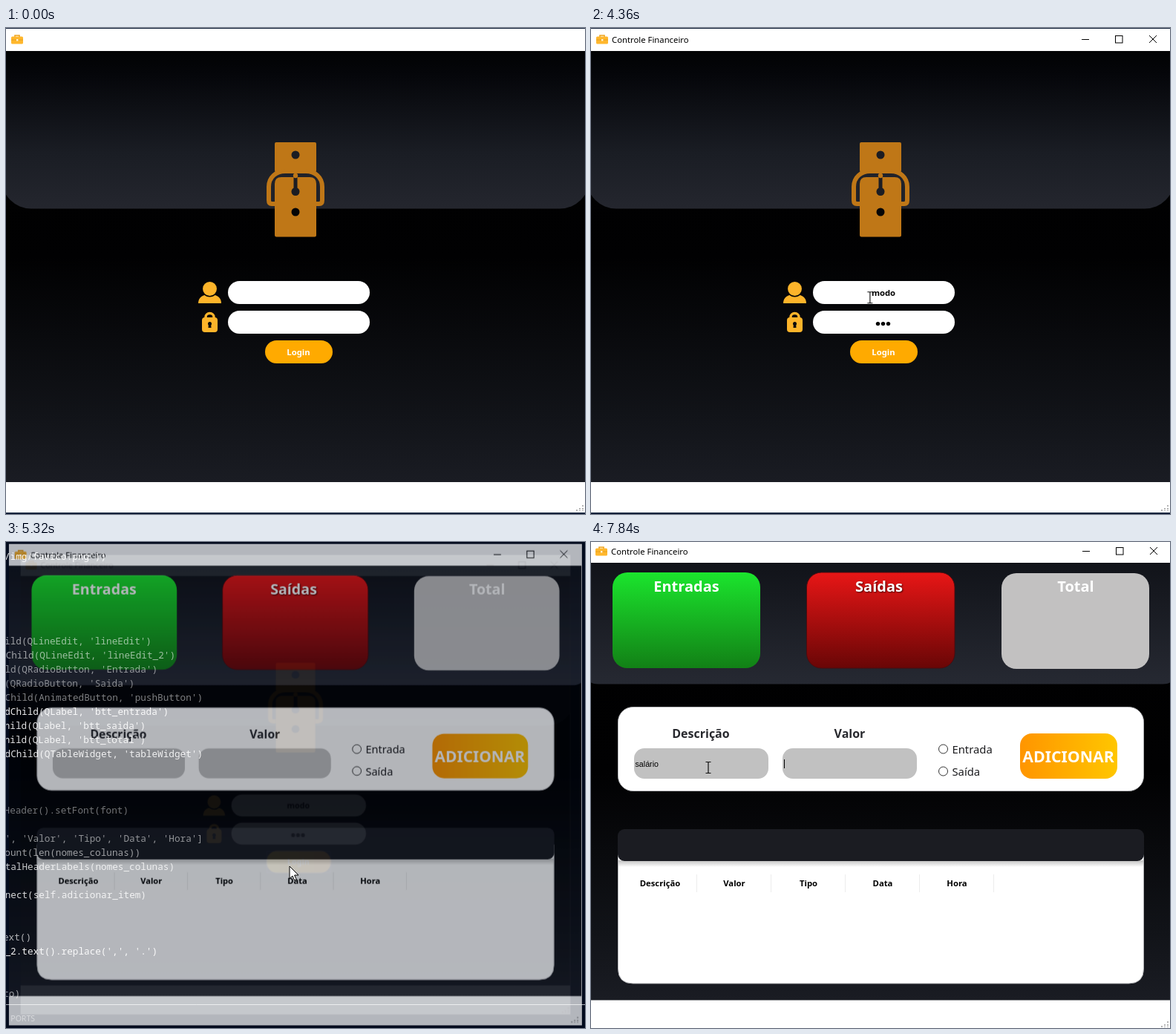
An HTML page that plays this animation: 780x655 px, repeating every 8 s.

```html
<!DOCTYPE html>
<html lang="pt">
<head>
<meta charset="utf-8">
<title>Controle Financeiro</title>
<style>
html, body { margin: 0; width: 100%; height: 100%; overflow: hidden; background: #020b1e; }
svg { display: block; width: 780px; height: 655px; font-family: "Noto Sans", "Open Sans", sans-serif; }
.b { font-weight: bold; }
.mid { text-anchor: middle; }
.title, .sm { font-size: 11.3px; }
.big { font-size: 20px; fill: #fff; }
.hint { fill: #6c5b3e; }
.lab { font-size: 16px; fill: #28292e; }
.radio { font-size: 14.8px; fill: #1c1c1f; }
.entry { font: 10.7px "Liberation Sans", Arial, sans-serif; }
.code text { font: 12.7px "Noto Sans Mono", monospace; fill: #fff; text-anchor: end; white-space: pre; }

#login, #main, #code, #hover, #mouse { animation: 8s linear infinite; }
#login { animation-name: leave; transform-origin: 390px 328px; }
#main { animation-name: enter; transform-origin: 360px 282px; }
#code { animation-name: flash; }
#hover { animation-name: glow; }
#mouse { animation-name: move; }

@keyframes leave {
  0%, 64.9% { opacity: 1; transform: none; }
  66.5% { opacity: .25; transform: scale(.95); }
  67.4%, 100% { opacity: 0; transform: scale(.92); }
}
@keyframes enter {
  0%, 64.9% { opacity: 0; transform: scale(.93); }
  66.5% { opacity: .7; transform: scale(.9834); }
  68.25%, 100% { opacity: 1; transform: none; }
}
@keyframes flash {
  0%, 64.9% { opacity: 0; }
  66.5% { opacity: 1; }
  67.4%, 100% { opacity: 0; }
}
@keyframes glow {
  0%, 59.3% { opacity: 0; }
  60.7%, 100% { opacity: 1; }
}
@keyframes move {
  0%, 3.375% { transform: translate(300px, 662px); }
  6.9% { transform: translate(290px, 500px); }
  10% { transform: translate(297px, 372px); }
  12.75% { transform: translate(372px, 356px); }
  14.5%, 53.75% { transform: translate(375px, 354px); }
  60.6%, 67.4% { transform: translate(382px, 437px); }
  71.75%, 73% { transform: translate(173px, 311px); }
  75.25%, 100% { transform: translate(158px, 304px); }
}
</style>
</head>
<body>
<svg viewBox="0 0 780 655">
  <defs>
    <linearGradient id="flap" gradientUnits="userSpaceOnUse" x1="0" y1="31" x2="0" y2="243">
      <stop offset="0" stop-color="#010203"/><stop offset=".15" stop-color="#05060a"/>
      <stop offset=".65" stop-color="#1a1d24"/><stop offset="1" stop-color="#24262e"/>
    </linearGradient>
    <linearGradient id="night" x1="0" y1="0" x2="0" y2="1">
      <stop offset="0" stop-color="#000"/><stop offset=".48" stop-color="#010102"/>
      <stop offset=".84" stop-color="#111318"/><stop offset="1" stop-color="#1a1c23"/>
    </linearGradient>
    <linearGradient id="head" x1="0" y1="0" x2="0" y2="1">
      <stop offset="0" stop-color="#111319"/><stop offset="1" stop-color="#262932"/>
    </linearGradient>
    <linearGradient id="green" x1="0" y1="0" x2="0" y2="1">
      <stop offset="0" stop-color="#1be52d"/><stop offset="1" stop-color="#128016"/>
    </linearGradient>
    <linearGradient id="red" x1="0" y1="0" x2="0" y2="1">
      <stop offset="0" stop-color="#e81616"/><stop offset="1" stop-color="#690606"/>
    </linearGradient>
    <linearGradient id="amber">
      <stop offset="0" stop-color="#ff9500"/><stop offset="1" stop-color="#ffc600"/>
    </linearGradient>
    <linearGradient id="amberRev">
      <stop offset="0" stop-color="#ffc600"/><stop offset="1" stop-color="#ff9200"/>
    </linearGradient>
    <linearGradient id="shade" x1="0" y1="0" x2="0" y2="1">
      <stop offset="0" stop-color="#000" stop-opacity=".25"/><stop offset="1" stop-color="#000" stop-opacity="0"/>
    </linearGradient>
    <g id="case">
      <path d="M5 3V1H11V3" fill="none" stroke="#f0a41c" stroke-width="1.6"/>
      <rect y="2.5" width="16" height="10" rx="1.5" fill="#ffb72d"/>
      <path d="M0 7H16" stroke="#e09a1c" stroke-width=".8"/>
      <rect x="7" y="6" width="2.4" height="2.4" fill="#fff3d6"/>
    </g>
    <g id="minmax" fill="none"><path d="M0 5.5H10"/><rect x="45.5" y=".5" width="9.5" height="9.5"/></g>
    <path id="close" d="M91 0L101 10M101 0L91 10"/>
    <g id="grip" fill="#b4b4b4">
      <path d="M776 643h2v2h-2zM772 647h2v2h-2zM776 647h2v2h-2zM768 651h2v-2h-2zM772 651h2v-1h-2zM776 651h2v-1h-2z"/>
    </g>
  </defs>

  <rect width="780" height="655" fill="#020b1e"/>
  <path d="M0 623.5H780" stroke="#5a6474"/>

  <g id="login">
    <rect width="780" height="655" fill="#14233c"/>
    <rect y="1" width="780" height="652" fill="#fff"/>
    <use href="#case" x="7" y="9"/>
    <text class="title" x="28" y="20" fill="#c2b39c" data-on="0-70">Controle Financeiro</text>
    <text class="title" x="28" y="20" data-on="70-8000">Controle Financeiro</text>
    <g transform="translate(661 10)">
      <use href="#minmax" stroke="#aaa" data-on="0-70"/><use href="#minmax" stroke="#000" data-on="70-8000"/>
      <use href="#close" stroke="#aaa" data-on="0-270"/><use href="#close" stroke="#000" data-on="270-8000"/>
    </g>
    <svg y="31" width="780" height="581" viewBox="0 31 780 581">
      <rect y="31" width="780" height="581" fill="url(#night)"/>
      <rect x="-6" y="-20" width="792" height="263.5" rx="40" fill="url(#flap)"/>
    </svg>
    <use href="#grip"/>

    <g fill="#bf7717">
      <rect x="362" y="154" width="56" height="40" rx="2"/>
      <path d="M362 237H358Q354 237 354 232V214C354 201 364 193 376 193H404C416 193 426 201 426 214V232Q426 237 422 237H418"
            fill="#20222a" stroke="#bf7717" stroke-width="6"/>
      <path d="M362 210Q362 201 371 201H409Q418 201 418 210V279Q418 281.500 415.500 281.500H364.500Q362 281.500 362 279Z"/>
      <g fill="#1c1d23">
        <circle cx="390" cy="171" r="5.500"/><circle cx="390" cy="220.500" r="5.500"/>
        <rect x="387.500" y="199" width="5" height="20"/>
      </g>
      <circle cx="390" cy="248" r="5.500" fill="#050506"/>
      <circle cx="390" cy="199" r="3.200"/>
    </g>

    <g fill="#fdb42a">
      <path d="M259 371C259 363 265 359 274.500 359S290 363 290 371Z"/>
      <circle cx="274.500" cy="351.500" r="10.200" stroke="#050506" stroke-width="1.500"/>
      <path d="M269 391V389.500A5.500 5 0 0 1 280 389.500V391" fill="none" stroke="#fdb42a" stroke-width="3.500"/>
      <rect x="264" y="390" width="21" height="20" rx="4"/>
      <path d="M273 398H276L276.500 404H272.500Z" fill="#0a0a0b"/><circle cx="274.500" cy="398.500" r="2.500" fill="#0a0a0b"/>
    </g>

    <g fill="#fff">
      <rect x="299" y="341" width="191" height="31" rx="15.500"/>
      <rect x="299" y="381" width="191" height="31" rx="15.500"/>
    </g>
    <g class="b sm mid">
      <text class="hint" x="394" y="361" data-on="0-950">Username</text>
      <text class="hint" x="394" y="401" data-on="0-2570">Password</text>
      <g id="user"></g>
      <rect x="349" y="421" width="91" height="31" rx="15.500" fill="#ffaa00"/>
      <rect id="hover" x="349" y="421" width="91" height="31" rx="15.500" fill="url(#amberRev)"/>
      <text x="394" y="441" fill="#fff">Login</text>
      <rect x="349.500" y="421.500" width="90" height="30" fill="none" stroke="#3f5c96" stroke-dasharray="1 1" data-on="5050-8000"/>
    </g>
    <g id="pass"></g>
  </g>

  <g id="main">
    <rect x="-2" y="-2" width="784" height="659" fill="#fff"/>
    <use href="#case" x="6" y="6"/>
    <text class="title" x="27" y="17">Controle Financeiro</text>
    <g transform="translate(662 7)" stroke="#000"><use href="#minmax"/><use href="#close"/></g>
    <rect x="-2" y="28" width="784" height="589.500" fill="url(#night)"/>
    <path d="M-2 28H782V188Q778 191.500 770 191.500H10Q2 191.500 -2 188Z" fill="url(#head)"/>
    <use href="#grip" y="3"/>

    <rect x="29" y="41" width="199" height="129" rx="20" fill="url(#green)"/>
    <rect x="290.500" y="41" width="199.500" height="129" rx="20" fill="url(#red)" stroke="#4d0b0e"/>
    <rect x="553" y="42" width="199" height="129" rx="20" fill="#c2c1c1"/>
    <g class="b big mid">
      <text x="128.500" y="67">Entradas</text>
      <text x="388" y="67" style="text-shadow:1px 1px 2px #400">Saídas</text>
      <text x="653" y="67">Total</text>
    </g>

    <rect x="36.500" y="222.500" width="708" height="113" rx="20" fill="#fff" stroke="#b5b6b9"/>
    <g class="b lab mid"><text x="148" y="264">Descrição</text><text x="348.500" y="264">Valor</text></g>
    <g fill="#c1c1c1">
      <rect x="58" y="278" width="181" height="41" rx="14"/><rect x="258" y="278" width="181" height="41" rx="14"/>
    </g>
    <g fill="#fff" stroke="#333">
      <circle cx="474.500" cy="279" r="6"/><circle cx="474.500" cy="309" r="6"/>
    </g>
    <g class="radio"><text x="486.500" y="285">Entrada</text><text x="486.500" y="315">Saída</text></g>
    <rect x="578" y="258" width="131" height="61" rx="16" fill="url(#amber)"/>
    <text class="b mid" x="643" y="297" font-size="21.300" fill="#fff">ADICIONAR</text>

    <path d="M36.500 410H744.500V575Q744.500 595 724.500 595H56.500Q36.500 595 36.500 575Z" fill="#fff" stroke="#b5b6b9"/>
    <rect x="37" y="429" width="707" height="9" fill="url(#shade)"/>
    <rect x="36" y="387" width="709" height="43" rx="9" fill="#1b1c22"/>
    <path d="M142.500 448v24m100-24v24m100-24v24m100-24v24m100-24v24" stroke="#ececec"/>
    <g class="b sm mid" id="cols"></g>
    <g class="entry" id="desc"></g>
    <rect x="260" y="293" width="1" height="12" data-on="7840-8000"/>
  </g>

  <g id="code" class="code"></g>

  <g id="mouse">
    <path d="M0 0V16.500L4 13L6.700 19L9.300 17.900L6.600 12H12Z" fill="#fff" stroke="#000" data-on="270-820,4419-4479,4684-5718"/>
    <path d="M-3.500 -7.500H-1Q0 -7.500 0 -6.500Q0 -7.500 1 -7.500H3.500M0 -6.500V7M-3.500 7.500H-1Q0 7.500 0 6.500Q0 7.500 1 7.500H3.500"
          fill="none" stroke="#111" stroke-width="1.200" data-on="820-4419,4479-4684,5718-8000"/>
  </g>
</svg>

<script>
const LOOP = 8000;
const byId = id => document.getElementById(id);

function add(parent, tag, attrs, text = '') {
  const el = document.createElementNS('http://www.w3.org/2000/svg', tag);
  for (const k in attrs) el.setAttribute(k, attrs[k]);
  el.textContent = text;
  return parent.appendChild(el);
}

// Each state: text, start, end, caret shown (1 or 0)
function typing(box, x, y, centred, states) {
  for (const [text, from, to, caret] of states) {
    const on = `${from}-${to}`;
    const el = add(box, 'text', { x, y, 'data-on': on }, text);
    const width = text ? el.getComputedTextLength() : 0;
    const end = Math.round(x + (centred ? width / 2 : width));
    if (caret) add(box, 'rect', { x: end, y: y - 11, width: 1, height: 13, 'data-on': on });
  }
}

function dots(box, states) {
  for (const [n, from, to, caret] of states) {
    const g = add(box, 'g', { 'data-on': `${from}-${to}` });
    for (let i = 0; i < n; i++) add(g, 'circle', { cx: 393.5 + 7 * (i - (n - 1) / 2), cy: 398.6, r: 2.7 });
    if (caret) add(g, 'rect', { x: 394 + Math.round(3.5 * n), y: 390, width: 1, height: 13 });
  }
}

typing(byId('user'), 394, 361, true, [
  ['', 950, 1950, 1], ['m', 1950, 2090, 1], ['mo', 2090, 2220, 1], ['mod', 2220, 2360, 1],
  ['modo', 2360, 2570, 1], ['modo', 2570, LOOP, 0]
]);
dots(byId('pass'), [
  [0, 2570, 2970, 1], [1, 2970, 3230, 1], [2, 3230, 3430, 1], [3, 3430, 3960, 1],
  [3, 3960, 4490, 0], [3, 4490, 5020, 1], [3, 5020, LOOP, 0]
]);
typing(byId('desc'), 59.5, 303, false, [
  ['', 5880, 6560, 1], ['s', 6700, 6900, 1], ['sa', 6900, 7160, 1], ['sal', 7160, 7230, 1],
  ['salá', 7230, 7360, 1], ['salár', 7360, 7560, 1], ['salári', 7560, 7630, 1],
  ['salário', 7630, 7840, 1], ['salário', 7840, LOOP, 0]
]);

['Descrição', 'Valor', 'Tipo', 'Data', 'Hora'].forEach((name, i) =>
  add(byId('cols'), 'text', { x: 93 + 100 * i, y: 464 }, name));

// Right edge, middle line, opacity, text
[
  [135, 20, .95, "/img/favico.png'))"],
  [196, 134, .6, "ild(QLineEdit, 'lineEdit')"],
  [228, 153, .6, "Child(QLineEdit, 'lineEdit_2')"],
  [204, 172, .55, "ld(QRadioButton, 'Entrada')"],
  [173, 191, .5, "(QRadioButton, 'Saida')"],
  [265, 210, .5, "Child(AnimatedButton, 'pushButton')"],
  [219, 229, .95, "dChild(QLabel, 'btt_entrada')"],
  [188, 248, .9, "hild(QLabel, 'btt_saida')"],
  [188, 267, .9, "hild(QLabel, 'btt_total')"],
  [265, 286, .9, "dChild(QTableWidget, 'tableWidget')"],
  [165, 362, .45, "Header().setFont(font)"],
  [265, 400, .55, "', 'Valor', 'Tipo', 'Data', 'Hora']"],
  [181, 419, .6, "ount(len(nomes_colunas))"],
  [227, 438, .8, "talHeaderLabels(nomes_colunas)"],
  [189, 476, .85, "nnect(self.adicionar_item)"],
  [34, 533, .7, "ext()"],
  [204, 552, .95, "_2.text().replace(',', '.')"],
  [19, 609, .6, "to)"]
].forEach(([x, y, opacity, text]) => add(byId('code'), 'text', { x, y: y + 4, opacity }, text));
add(byId('code'), 'text', { x: 39, y: 646, opacity: .5, style: 'font:10.5px "Noto Sans",sans-serif' }, 'PORTS');
add(byId('code'), 'path', { d: 'M0 623.5H780', stroke: '#fff', opacity: .5 });

// Show each part only during its listed spans
for (const el of document.querySelectorAll('[data-on]')) {
  const keys = [{ offset: 0, opacity: 0 }];
  for (const span of el.dataset.on.split(',')) {
    const [from, to] = span.split('-');
    keys.push({ offset: from / LOOP, opacity: 1 }, { offset: to / LOOP, opacity: 0 });
  }
  keys.push({ offset: 1, opacity: 0 });
  keys.forEach(k => k.easing = 'step-end');
  el.animate(keys, { duration: LOOP, iterations: Infinity });
}

// One shared clock for all parts
const start = document.timeline.currentTime || 0;
document.getAnimations().forEach(a => a.startTime = start);
</script>
</body>
</html>
```
